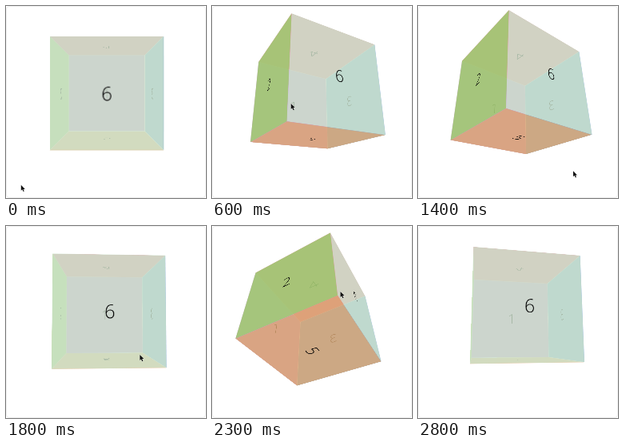
Recreate the animation shown at these times as an HTML page. Size 250 by 240 pixels, loop 2.9 s.

```html
<!DOCTYPE html>
<html lang="en">
<head>
<meta charset="utf-8">
<title>Dice cube</title>
<style>
  html, body { margin: 0; width: 100%; height: 100%; overflow: hidden; background: #fff; }
  .stage { position: absolute; left: 0; top: 0; width: 250px; height: 240px; overflow: hidden; }
  .frame { position: absolute; inset: 0; box-sizing: border-box; border: 1px solid #eee; border-radius: 4px; }
  .scene { position: absolute; left: 69.4px; top: 52px; width: 114px; height: 114px; perspective: 285px; }
  /* laid out at double size for crisp text, scaled down in draw() */
  .cube { position: absolute; inset: -57px; transform-style: preserve-3d; }
  .face {
    position: absolute; inset: 0; text-align: center; color: #000; will-change: transform;
    font: 300 38px/228px "Open Sans", "Liberation Sans", sans-serif;
  }
  .cursor { position: absolute; left: 0; top: 0; width: 7px; height: 11px; overflow: visible; }
</style>
</head>
<body>
<div class="stage">
  <div class="frame"></div>
  <div class="scene"><div class="cube" id="cube"></div></div>
  <svg class="cursor" id="cursor" viewBox="0 0 7 11">
    <path d="M0 0V7L1.6 5.5L2.8 8.3L4 7.8L2.8 5.1H5Z" fill="#111" stroke="#fff" stroke-width=".6" paint-order="stroke"/>
  </svg>
</div>
<script>
const LOOP = 2900, STEP = 100, HALF = 114, TURN = 555;
const cube = document.getElementById('cube');
const cursor = document.getElementById('cursor');

// faces 1 to 6: back, left, right, top, bottom, front
const faces = [
  ['#ba82c7cc', `translateZ(${-HALF}px)`],
  ['#a1c973e6', `rotateY(-90deg) translateZ(${HALF}px)`],
  ['#699bcdcc', `rotateY(90deg) translateZ(${HALF}px)`],
  ['#da7086cc', `rotateX(90deg) translateZ(${HALF}px)`],
  ['#dea770cc', `rotateX(-90deg) translateZ(${HALF}px)`],
  ['#cee4cccc', `translateZ(${HALF}px)`]
];
faces.forEach(([colour, place], i) => {
  const el = document.createElement('div');
  el.className = 'face';
  el.textContent = i + 1;
  el.style.background = colour;
  el.style.transform = place;
  cube.append(el);
});

// the cube turns while the pointer is over it
const hovers = [{ enter: 440, leave: 1270 }, { enter: 1763, leave: 2515 }];

// pointer stops, joined by a smooth curve
const stops = [
  { t: 200, x: 18.8, y: 223.8 },
  { t: 600, x: 98.7, y: 122 },
  { t: 1000, x: 158.5, y: 86.3 },
  { t: 1400, x: 194, y: 206.3 },
  { t: 1500, x: 198, y: 217 },
  { t: 1800, x: 167.3, y: 161 },
  { t: 2300, x: 160.5, y: 82 },
  { t: 2500, x: 192, y: 202 }
];

const bez = (u, a, b) => 3 * u * (1 - u) ** 2 * a + 3 * u * u * (1 - u) * b + u ** 3;

// CSS "ease"
function ease(p) {
  if (p <= 0) return 0;
  if (p >= 1) return 1;
  let lo = 0, hi = 1;
  for (let i = 0; i < 24; i++) {
    const mid = (lo + hi) / 2;
    if (bez(mid, .25, .25) < p) lo = mid; else hi = mid;
  }
  return bez(lo, .1, 1);
}

const turnAt = t => hovers.reduce(
  (v, h) => v + ease((t - h.enter) / TURN) - ease((t - h.leave) / TURN), 0);

function slope(i, key) {
  const a = stops[Math.max(i - 1, 0)], b = stops[Math.min(i + 1, stops.length - 1)];
  return (b[key] - a[key]) / (b.t - a.t);
}

function pointerAt(t, key) {
  const i = Math.max(1, stops.findIndex(s => s.t >= t));
  const a = stops[i - 1], b = stops[i], d = b.t - a.t;
  const k = Math.max(0, (t - a.t) / d), m = 1 - k;
  return a[key] * m * m * (1 + 2 * k) + b[key] * k * k * (1 + 2 * m)
    + d * k * m * (slope(i - 1, key) * m - slope(i, key) * k);
}

function draw(now) {
  const t = Math.floor(now % LOOP / STEP) * STEP;
  const v = turnAt(t);
  cube.style.transform = `scale3d(.5,.5,.5) rotateX(${45 * v}deg) rotateY(${60 * v}deg)`;
  const shown = t <= stops[stops.length - 1].t;
  cursor.style.display = shown ? '' : 'none';
  if (shown) cursor.style.transform = `translate(${pointerAt(t, 'x')}px,${pointerAt(t, 'y')}px)`;
}

const begin = performance.now();
function tick() {
  draw(performance.now() - begin);
  requestAnimationFrame(tick);
}
tick();
</script>
</body>
</html>
```
